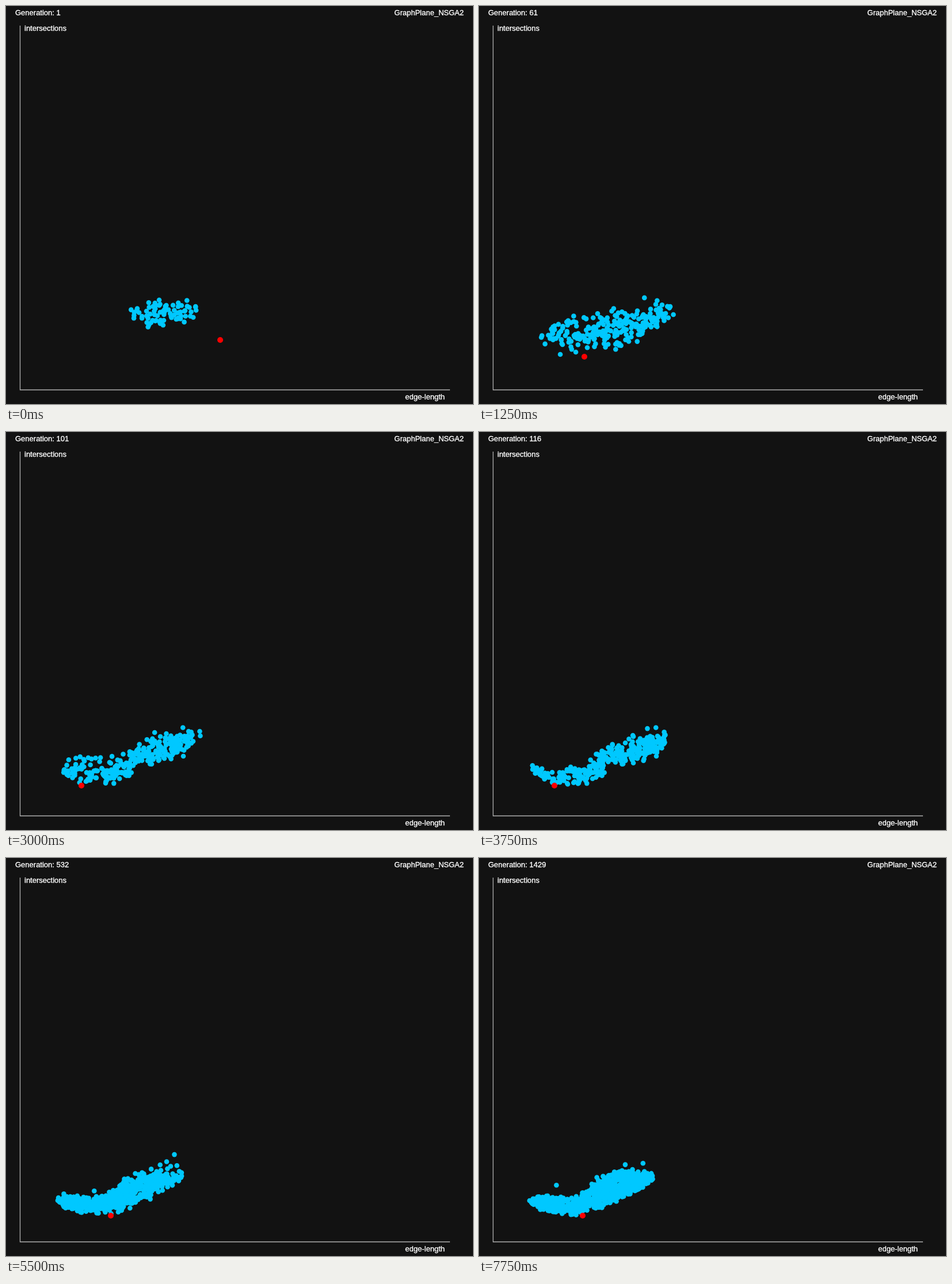
An HTML page with a canvas that plays this animation: 811x690 px, repeating every 10 s.

```html
<!DOCTYPE html>
<html lang="en">
<head>
<meta charset="utf-8">
<title>Population plot</title>
<style>
html, body { margin: 0; width: 100%; height: 100%; overflow: hidden; background: #121212; }
canvas { display: block; }
</style>
</head>
<body>
<canvas id="plot" width="811" height="690"></canvas>
<script>
const ctx = document.getElementById('plot').getContext('2d');
const LOOP = 10000, STEP = 250, LAST = 31;

function seeded(seed) {
  return () => {
    seed = (seed + 0x6D2B79F5) | 0;
    let t = Math.imul(seed ^ (seed >>> 15), 1 | seed);
    t = (t + Math.imul(t ^ (t >>> 7), 61 | t)) ^ t;
    return ((t ^ (t >>> 14)) >>> 0) / 4294967296;
  };
}

// Linear interpolation of one column; column 0 holds the key
function interpolate(keys, at, column = 1) {
  const next = Math.max(1, keys.findIndex(key => key[0] >= at));
  const a = keys[next - 1], b = keys[next];
  return a[column] + (b[column] - a[column]) * (at - a[0]) / (b[0] - a[0]);
}

// Scatters points evenly over a band given by spine points [x, y, half height]
function population(step, count, spine) {
  const random = seeded(step + 5), points = [];
  const left = spine[0][0], width = spine.at(-1)[0] - left;
  const widest = Math.max(...spine.map(point => point[2]));
  while (points.length < count) {
    const x = left + width * random();
    const spread = interpolate(spine, x, 2);
    if (random() * widest > spread) continue;
    const offset = spread * (random() + 0.5 * random() - 0.75) / 0.75;
    const lift = random() < 0.02 ? 25 * random() : 0;
    points.push([x, interpolate(spine, x) + offset - lift]);
  }
  return { step, points };
}

const settled = [[87, 593, 6], [120, 600, 17], [170, 603, 17], [205, 582, 30], [250, 565, 29], [302, 555, 8]];
const stages = [
  population(0, 80, [[215, 530, 10], [270, 537, 38], [331, 528, 12]]),
  population(3, 230, [[118, 566, 16], [190, 560, 36], [245, 554, 38], [338, 537, 8]]),
  population(8, 235, [[104, 580, 15], [140, 582, 28], [190, 583, 24], [260, 556, 37], [338, 528, 16]]),
  population(15, 320, [[92, 584, 8], [130, 601, 13], [185, 594, 22], [230, 564, 27], [326, 535, 24]]),
  population(23, 640, settled),
  population(LAST, 700, settled)
];

const generations = [[0, 1], [3, 47], [8, 81], [15, 116], [19, 212], [26, 958], [LAST, 1429]];

// [step, x, y] from which the best individual sits there
const best = [
  [0, 372, 579], [1, 433, 577], [2, 182, 597], [5, 183, 608],
  [12, 131, 613], [17, 174, 616], [22, 182, 620], [28, 180, 620]
];

function dot(x, y, radius, color) {
  ctx.fillStyle = color;
  ctx.beginPath();
  ctx.arc(x, y, radius, 0, 2 * Math.PI);
  ctx.fill();
}

// The thin outline gives the text its slightly heavier weight
function label(text, x, y, align = 'left') {
  ctx.font = '13px "Liberation Sans", Arial, sans-serif';
  ctx.fillStyle = ctx.strokeStyle = '#fff';
  ctx.lineWidth = 0.35;
  ctx.textAlign = align;
  ctx.fillText(text, x, y);
  ctx.strokeText(text, x, y);
}

function drawAxes() {
  ctx.strokeStyle = '#b0b0b0';
  ctx.lineWidth = 1.3;
  ctx.beginPath();
  ctx.moveTo(24.5, 34);
  ctx.lineTo(24.5, 665.5);
  ctx.lineTo(771, 665.5);
  ctx.stroke();
}

// Individuals are replaced one by one on the way to the next stage
function drawPopulation(step) {
  const next = Math.max(1, stages.findIndex(stage => stage.step >= step));
  const from = stages[next - 1], to = stages[next];
  const progress = (step - from.step) / (to.step - from.step);
  const size = Math.max(from.points.length, to.points.length);
  for (let i = 0; i < size; i++) {
    const replaced = (i * 0.618034) % 1 < progress;
    const point = (replaced ? to : from).points[i];
    if (point) dot(...point, 4.3, '#00c8ff');
  }
}

function draw(step) {
  ctx.fillStyle = '#121212';
  ctx.fillRect(0, 0, 811, 690);
  drawAxes();
  drawPopulation(step);
  const [, x, y] = best.findLast(stop => stop[0] <= step);
  dot(x, y, 5, '#f00');
  label('Generation: ' + Math.round(interpolate(generations, step)), 16, 16);
  label('GraphPlane_NSGA2', 795, 16, 'right');
  label('intersections', 32, 43);
  label('edge-length', 762, 682, 'right');
}

function tick() {
  draw(Math.min(LAST, Math.floor((performance.now() % LOOP) / STEP)));
  requestAnimationFrame(tick);
}
tick();
</script>
</body>
</html>
```
